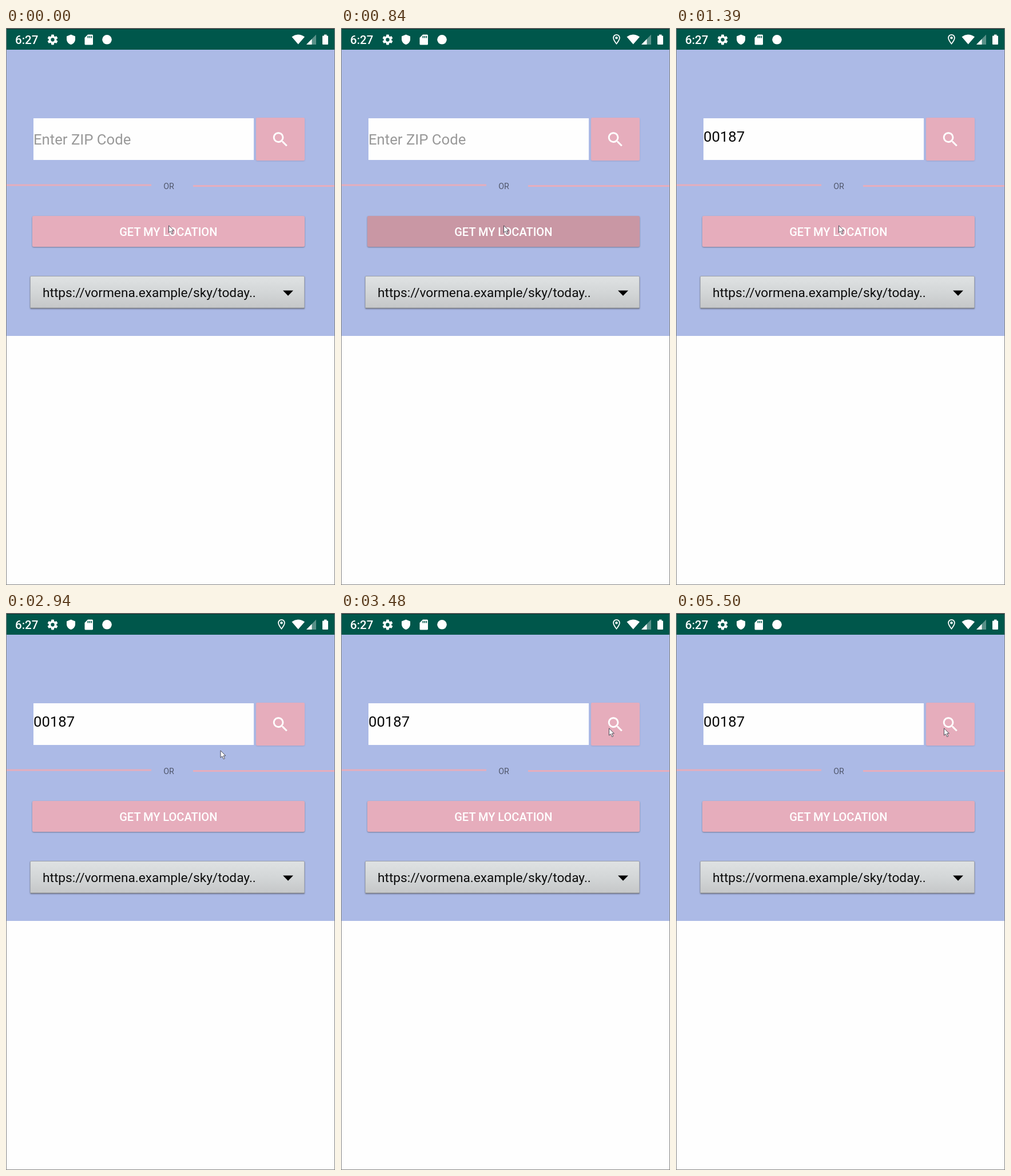
Recreate the animation shown at these times as an HTML page. Size 575 by 975 pixels, loop 8000 ms.

```html
<!DOCTYPE html>
<html lang="en">
<head>
<meta charset="utf-8">
<title>Location search</title>
<style>
  html, body { margin: 0; width: 100%; height: 100%; overflow: hidden; background: #fefefe; }
  svg { display: block; width: 100vw; height: 100vh; }
  text { font-family: Roboto, sans-serif; }
  .medium { font-weight: 500; fill: #fff; }
  .pink { fill: #e6adbc; }
  .pressed { fill: #c997a4; }
  .raised { filter: drop-shadow(0 1px 1px rgba(0, 0, 0, .36)); }
</style>
</head>
<body>
<svg viewBox="0 0 575 975">
  <defs>
    <linearGradient id="metal" x2="0" y2="1">
      <stop offset="0" stop-color="#dfe2e3"/>
      <stop offset=".5" stop-color="#d3d6d7"/>
      <stop offset="1" stop-color="#c5c7c8"/>
    </linearGradient>
    <clipPath id="searchClip"><rect x="437" y="157" width="85" height="75" rx="2"/></clipPath>
  </defs>

  <rect width="575" height="975" fill="#fefefe"/>
  <rect y="38" width="575" height="501" fill="#acbae6"/>
  <rect width="575" height="38" fill="#00574b"/>
  <rect y="1" width="575" height="1" fill="#1c2a28"/>

  <!-- status bar -->
  <text class="medium" x="16" y="28" font-size="20.5">6:27</text>
  <g fill="#fff">
    <path transform="translate(70.7 9.7) scale(.9)" fill-rule="evenodd" d="M19.43 12.98c.04-.32.07-.64.07-.98s-.03-.66-.07-.98l2.11-1.65c.19-.15.24-.42.12-.64l-2-3.46c-.12-.22-.39-.3-.61-.22l-2.49 1c-.52-.4-1.08-.73-1.69-.98l-.38-2.65C14.46 2.18 14.25 2 14 2h-4c-.25 0-.46.18-.49.42l-.38 2.65c-.61.25-1.17.59-1.69.98l-2.49-1c-.23-.09-.49 0-.61.22l-2 3.46c-.13.22-.07.49.12.64l2.11 1.65c-.04.32-.07.65-.07.98s.03.66.07.98l-2.11 1.65c-.19.15-.24.42-.12.64l2 3.46c.12.22.39.3.61.22l2.49-1c.52.4 1.08.73 1.69.98l.38 2.65c.03.24.24.42.49.42h4c.25 0 .46-.18.49-.42l.38-2.65c.61-.25 1.17-.59 1.69-.98l2.49 1c.23.09.49 0 .61-.22l2-3.46c.12-.22.07-.49-.12-.64l-2.11-1.65zM12 15.5a3.5 3.5 0 1 1 0-7 3.5 3.5 0 0 1 0 7z"/>
    <path d="M113.5 11.5L106 14.5v5.2c0 4.3 3.2 8.2 7.5 9.4 4.3-1.2 7.5-5.1 7.5-9.4v-5.2z"/>
    <path fill-rule="evenodd" d="M143 11.500h7.500q1.500 0 1.500 1.500v15q0 1.500-1.500 1.500h-11.500q-1.500 0-1.500-1.500v-11zM142.500 14v3.500h1.700v-3.500zM145.500 14v3.500h1.700v-3.500zM148.500 14v3.500h1.700v-3.500z"/>
    <circle cx="176.500" cy="20.300" r="8.300"/>
    <path d="M499.500 15.500Q510.500 7.500 522 15.500L510.700 28.500z"/>
    <path d="M542 11.500v17.500h-17z" opacity=".35"/>
    <path d="M534.500 19.300v9.700h-9.500z"/>
    <path d="M556 11.500h4.500v2h1.500q1 0 1 1v13.500q0 1-1 1h-8q-1 0-1-1v-13.500q0-1 1-1h2z"/>
    <path id="pin" fill-rule="evenodd" d="M481.500 11c-3.500 0-6.300 2.800-6.300 6.300 0 4.700 6.300 11.700 6.300 11.700s6.300-7 6.300-11.700c0-3.500-2.800-6.300-6.300-6.300zM481.500 12.800c2.500 0 4.500 2 4.500 4.500 0 2.600-2.600 6.500-4.500 8.900-1.900-2.400-4.500-6.300-4.500-8.900 0-2.500 2-4.500 4.500-4.500zM479.200 17.300a2.300 2.300 0 1 0 4.600 0 2.300 2.300 0 1 0-4.600 0z"/>
  </g>

  <!-- ZIP field -->
  <rect x="48" y="158" width="385" height="73" fill="#fefefe"/>
  <text id="hint" x="48" y="204" font-size="25.700" fill="#999">Enter ZIP Code</text>
  <text id="zip" x="48" y="199" font-size="25.700" fill="#0a0a0a">00187</text>

  <rect class="pink" x="437" y="157" width="85" height="75" rx="2" style="filter:drop-shadow(0 1px 1px rgba(90,70,110,.22))"/>
  <circle id="ripple" class="pressed" cx="467.500" cy="198" r="62" clip-path="url(#searchClip)"/>
  <path fill="#fff" transform="translate(462.500 178) scale(1.430)" d="M15.500 14h-.790l-.280-.270C15.410 12.590 16 11.110 16 9.500 16 5.910 13.090 3 9.500 3S3 5.910 3 9.500 5.910 16 9.500 16c1.610 0 3.090-.590 4.230-1.570l.270.280v.790l5 4.990L20.490 19l-4.990-5zm-6 0C7.010 14 5 11.990 5 9.500S7.010 5 9.500 5 14 7.010 14 9.500 11.990 14 9.500 14z"/>

  <rect class="pink" y="273.500" width="254" height="3"/>
  <rect class="pink" x="327" y="275" width="248" height="3"/>
  <text x="284.500" y="282" font-size="14.300" text-anchor="middle" fill="#50576c">OR</text>

  <g class="raised"><rect id="locate" class="pink" x="46" y="329" width="476" height="54" rx="2.500"/></g>
  <text class="medium" x="283.800" y="364" font-size="20" text-anchor="middle">GET MY LOCATION</text>

  <!-- drop-down -->
  <g class="raised">
    <rect x="42.500" y="434.500" width="479" height="56" rx="1.500" fill="url(#metal)" stroke="#a3a7ae"/>
    <path d="M43 490.300H521.500" stroke="#7c7f85" stroke-width="1.300"/>
  </g>
  <text x="64" y="471" font-size="22.700" fill="#0c0c0c">https://vormena.example/sky/today..</text>
  <path d="M484 459.500h18l-9 9.300z"/>

  <path id="cursor" d="M.5.8v12.400l2.900-2.500 2.300 5 2.100-1-2.300-4.800h3.900z" fill="#fff" stroke="#3b3b48" stroke-width=".9" stroke-linejoin="round"/>

  <path d="M0 .5H575M.5 0V975M574.500 0V975M0 974.500H575" stroke="#858585" fill="none"/>
</svg>
<script>
  const LOOP = 8000;
  const [pin, hint, zip, ripple, locate, cursor] =
    ["pin", "hint", "zip", "ripple", "locate", "cursor"].map(id => document.getElementById(id));

  // [time, x, y]: the pointer jumps from stop to stop
  const pointerStops = [
    [0, 284, 345], [2940, 374.5, 240], [3060, 388, 231],
    [3210, 425, 223], [3330, 458, 215], [3480, 468, 201]
  ];

  const show = (node, on) => node.setAttribute("visibility", on ? "visible" : "hidden");
  const within = (t, from, to) => t >= from && t < to;

  function draw(t) {
    const [, x, y] = pointerStops.filter(stop => stop[0] <= t).pop();
    cursor.setAttribute("transform", `translate(${x} ${y})`);
    show(pin, t >= 430);
    show(hint, t < 1390);
    show(zip, t >= 1390);
    show(ripple, within(t, 5250, 5500));
    locate.setAttribute("class", within(t, 840, 1110) ? "pressed" : "pink");
  }

  const start = performance.now();
  function tick() {
    draw((performance.now() - start) % LOOP);
    requestAnimationFrame(tick);
  }
  tick();
</script>
</body>
</html>
```
